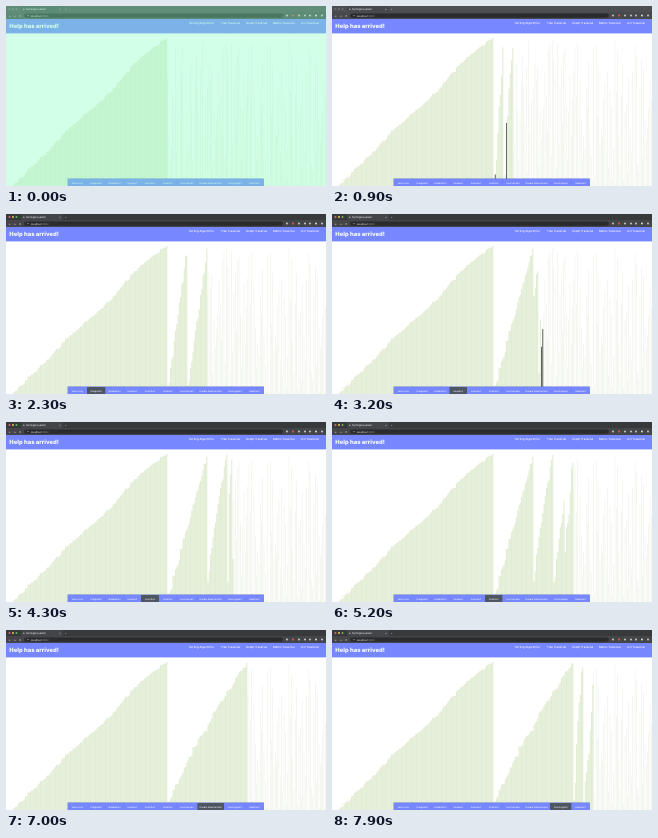
An HTML page for the animation above (8 s loop, 320 px wide and 180 px high).

```html
<!DOCTYPE html>
<html lang="en">
<head>
<meta charset="utf-8">
<title>Sorting visualizer</title>
<style>
  html, body { margin: 0; width: 100%; height: 100%; overflow: hidden; background: #fff; }
  svg { display: block; width: 100vw; height: 100vh; }
  text { font-family: Inter, "Open Sans", sans-serif; fill: #fff; text-rendering: geometricPrecision; }
  .strip { fill: #37393b; }
  .tab, .toolbar { fill: #434548; }
  .idle .strip { fill: #4c4e51; }
  .idle .tab, .idle .toolbar { fill: #47494c; }
  .idle .light { fill: #707275; }
  .small { font-size: 2.5px; }
  .nav { font-size: 2.8px; font-weight: 500; }
  .button { fill: #7687ff; }
  .button.hover { fill: #4d5661; }
  .label { font-size: 2.25px; text-anchor: middle; }
</style>
</head>
<body>
<svg id="stage" viewBox="0 0 320 180" preserveAspectRatio="none">
  <rect width="320" height="180" fill="#fff"/>
  <path id="waiting" fill="#e9ece0"/>
  <path id="sorted" fill="#e1edd2"/>
  <path id="active" fill="#626862"/>

  <g id="chrome">
    <rect class="strip" width="320" height="6.5"/>
    <rect class="tab" x="15" width="42" height="7" rx="1"/>
    <rect class="toolbar" y="6" width="320" height="7"/>
    <circle class="light" cx="3.5" cy="3" r="1" fill="#ed6a5e"/>
    <circle class="light" cx="7" cy="3" r="1" fill="#f4bf4f"/>
    <circle class="light" cx="10.5" cy="3" r="1" fill="#61c554"/>
    <circle cx="17.8" cy="3.2" r=".8" fill="#aeb3b8"/>
    <text class="small" x="20" y="4.1">SortingVisualizer</text>
    <text class="small" x="53" y="4.1">×</text>
    <text class="small" x="59" y="4.3">+</text>
    <text class="small" x="2.5" y="10.5">←</text>
    <text class="small" x="7.5" y="10.5">→</text>
    <text class="small" x="13" y="10.5">↻</text>
    <rect x="18" y="7.4" width="259" height="4.4" rx="2.2" fill="#292b2e"/>
    <circle cx="22" cy="9.6" r=".7" fill="#9aa0a6"/>
    <text class="small" x="25" y="10.5">localhost<tspan fill="#9aa0a6">:3000</tspan></text>
    <g id="icons"></g>
  </g>

  <rect y="13" width="320" height="14.4" fill="#7687ff"/>
  <text x="3.3" y="22.4" font-size="5.9" font-weight="800">Help has arrived!</text>
  <g id="nav"></g>
  <rect x="61.6" y="172.5" width="196.2" height="8" fill="#6272d6"/>
  <g id="buttons"></g>
  <rect id="tint" width="320" height="180" fill="#82ffbe"/>
</svg>

<script>
const byId = id => document.getElementById(id);

function add(parent, tag, attributes, content = '') {
  const node = document.createElementNS('http://www.w3.org/2000/svg', tag);
  for (const name in attributes) node.setAttribute(name, attributes[name]);
  node.textContent = content;
  parent.append(node);
  return node;
}

[['Sorting Algorithms', 183], ['Tree Traversal', 215], ['Graph Traversal', 240],
 ['Matrix Traversal', 267], ['List Traversal', 295]]
  .forEach(([name, x]) => add(byId('nav'), 'text', { class: 'nav', x, y: 18.2 }, name));

[['#c4c8cc', 281], ['#e05a4f', 287], ['#c4c8cc', 293], ['#c4c8cc', 299],
 ['#c4c8cc', 304], ['#d9dcdf', 310], ['#c4c8cc', 316]]
  .forEach(([fill, cx]) => add(byId('icons'), 'circle', { cx, cy: 9.6, r: 1, fill }));

const edges = [62, 81, 99.5, 117.5, 135, 153, 170.5, 191.5, 218, 239.5, 257.4];
const buttons = ['New Array', 'MergeSort', 'BubbleSort', 'HeapSort', 'QuickSort',
  'ShellSort', 'InsertionSort', 'Double SelectionSort', 'CountingSort', 'RadixSort']
  .map((name, i) => {
    const x = edges[i], width = edges[i + 1] - x;
    const box = add(byId('buttons'), 'rect', { class: 'button', x, y: 173, width, height: 7 });
    add(byId('buttons'), 'text', { class: 'label', x: x + width / 2, y: 178.4 }, name);
    return box;
  });

// Linear interpolation through a few [x, y] points.
function interpolate(points, x) {
  const next = Math.max(1, points.findIndex(([px]) => px >= x));
  const [x0, y0] = points[next - 1], [x1, y1] = points[next];
  return y0 + (y1 - y0) * (x - x0) / (x1 - x0);
}

// Values: the left half is already sorted, the right half is shuffled.
const COUNT = 256, HALF = COUNT / 2, BLOCK = 16, LOOP = 8000;
let seed = 17;
const random = () => (seed = seed * 16807 % 2147483647) / 2147483647;

function shuffledBlock(skew) {
  const block = Array.from({ length: BLOCK }, (_, k) => ((k + random()) / BLOCK) ** skew);
  for (let i = BLOCK - 1; i > 0; i--) {
    const j = Math.floor(random() * (i + 1));
    [block[i], block[j]] = [block[j], block[i]];
  }
  return block;
}
const shuffled = [1, 1, 0.65, 0.65, 1, 1, 1, 1].flatMap(shuffledBlock);

const slope = [[0, 0], [5, 0], [19, 0.09], [41, 0.235], [56, 0.345], [89, 0.54],
  [106, 0.65], [116, 0.74], [137, 0.885], [160, 1]];
const ramp = Array.from({ length: HALF }, (_, i) =>
  Math.min(1, Math.max(0, interpolate(slope, (i + 1) * 1.25) + 0.024 * (random() - 0.5))))
  .sort((a, b) => a - b);
const initial = [...ramp, ...shuffled];

// Every write made by a merge sort of the right half, in order.
const writes = [];
function mergeSort(values, low, high) {
  if (high - low < 2) return;
  const middle = (low + high) / 2;
  mergeSort(values, low, middle);
  mergeSort(values, middle, high);
  const old = values.slice();
  let left = low, right = middle;
  for (let index = low; index < high; index++) {
    const fromLeft = right >= high || (left < middle && old[left] <= old[right]);
    values[index] = old[fromLeft ? left : right];
    writes.push({ index, value: values[index],
      pointers: [Math.min(left, middle - 1), Math.min(right, high - 1)] });
    fromLeft ? left++ : right++;
  }
}
mergeSort(initial.slice(), HALF, COUNT);

// Pace of the sort: [time, writes done].
const pace = [[0, 0], [300, 0], [900, 51], [1200, 70], [2300, 129], [2900, 162], [3200, 171],
  [4300, 233], [5900, 320], [7030, 384], [7500, 410], [7900, 431]];

// Pointer position: [time, button].
const hovers = [[0, -1], [1800, 0], [2300, 1], [2700, 2], [3000, 3], [3500, 4],
  [5200, 5], [5900, 6], [7000, 7], [7700, 8]];

function bar(i, value, width) {
  const height = 148 * value;
  return `M${1.5 + i * 1.25} ${180 - height}h${width}v${height}h${-width}z`;
}

function draw(time) {
  const done = Math.floor(interpolate(pace, time)), values = initial.slice();
  let reached = HALF;
  for (const { index, value } of writes.slice(0, done)) {
    values[index] = value;
    reached = Math.max(reached, index + 1);
  }
  const path = (from, to, width) =>
    values.slice(from, to).map((v, i) => bar(from + i, v, width)).join('');
  byId('sorted').setAttribute('d', path(0, reached, 1.1));
  byId('waiting').setAttribute('d', path(reached, COUNT, 0.45));

  const beat = time / 100 % 6;
  const comparing = time >= 400 && (beat === 2 || beat === 3);
  byId('active').setAttribute('d', comparing
    ? writes[done].pointers.map(i => bar(i, values[i], 1)).join('') : '');

  const hovered = hovers.filter(([t]) => t <= time).pop()[1];
  buttons.forEach((box, i) => box.classList.toggle('hover', i === hovered));
  byId('chrome').classList.toggle('idle', time < 1700);
  byId('tint').setAttribute('opacity', Math.max(0, 0.36 - time / 100 * 0.18));
}

const start = performance.now();
let shown = -1;
function tick() {
  const time = Math.floor((performance.now() - start) % LOOP / 100) * 100;
  if (time !== shown) draw(shown = time);
  requestAnimationFrame(tick);
}
tick();
</script>
</body>
</html>
```
